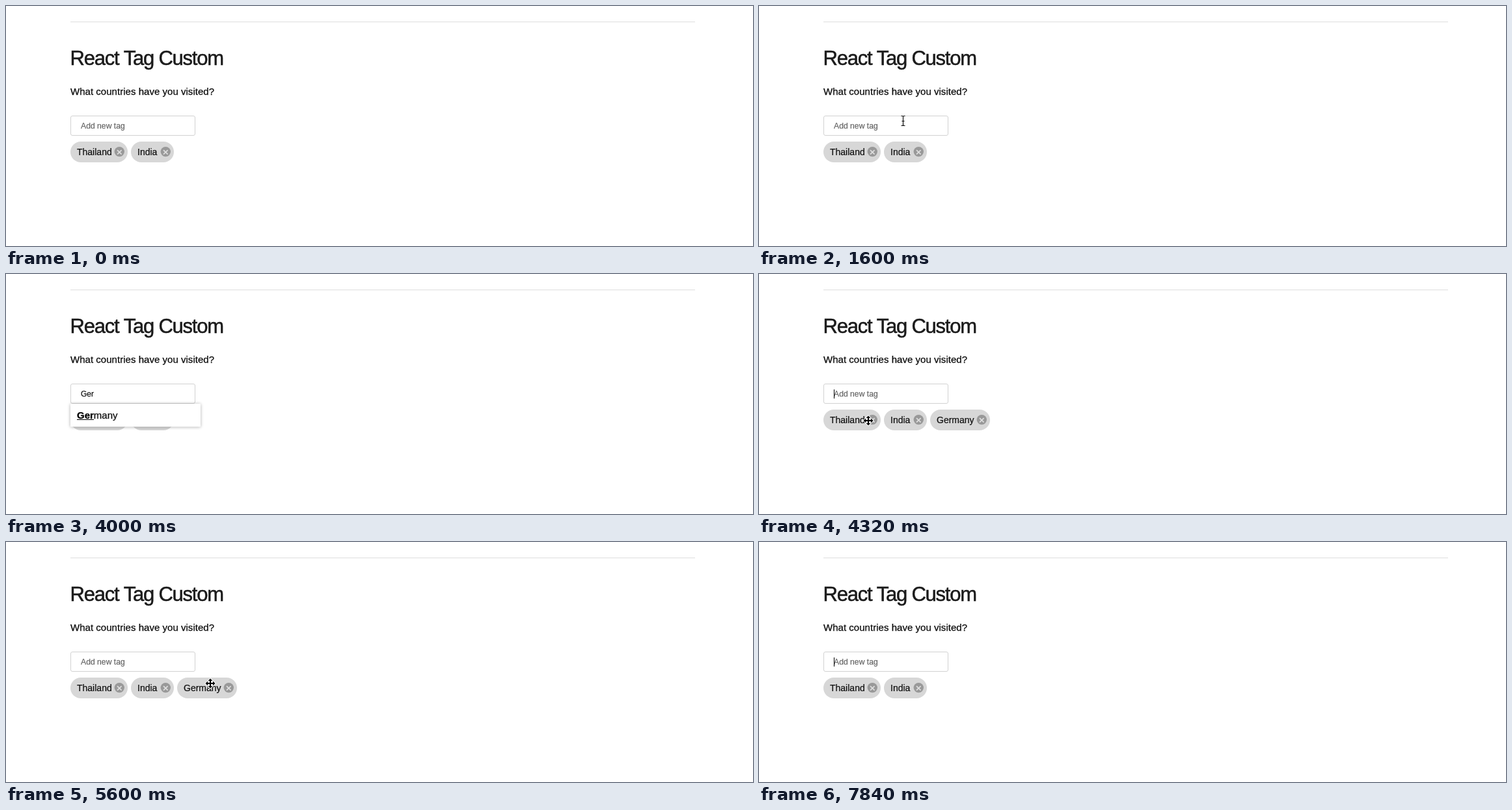
These frames come from a looping animation (1148 px wide and 370 px high, 8000 ms). An HTML page with a canvas:

```html
<!DOCTYPE html>
<html lang="en">
<head>
<meta charset="utf-8">
<title>React Tag Custom</title>
<style>
  html, body { margin: 0; width: 100%; height: 100%; overflow: hidden; background: #fff; }
  canvas { display: block; }
</style>
</head>
<body>
<canvas id="stage" width="1148" height="370"></canvas>
<script>
const ctx = document.getElementById('stage').getContext('2d');
const LOOP = 8000;
const SANS = '"Liberation Sans", Arial, sans-serif';

const TYPED = [3040, 4160];
const GERMANY = [4160, 7200];

// Spans in which the text caret is lit.
const CARET = [
  [480, 800], [1120, 1440], [1920, 2240], [2560, 3360], [3680, 4000],
  [4160, 4480], [4640, 4960], [5280, 5600], [5920, 6240], [6560, 6720],
  [7040, 7520], [7840, 8000]
];

// Each pointer pose holds until the next one.
const POINTER = [
  [0],
  [160, 'beam', 252, 189], [320, 'hand', 245, 226], [480, 'move', 236, 223],
  [640, 'move', 226, 220], [800, 'move', 222, 219],
  [1440, 'beam', 222, 192], [1600, 'beam', 221.5, 177], [1760, 'beam', 220.5, 182],
  [1920, 'beam', 219.5, 184], [2720],
  [4320, 'move', 168, 226], [4480, 'move', 142, 227], [4640, 'move', 152, 229],
  [4800, 'arrow', 189, 235], [4960, 'move', 216, 226], [5120, 'move', 284, 226],
  [5280, 'hand', 347, 231], [5440, 'move', 328, 222], [5600, 'move', 314, 218],
  [5760, 'beam', 274.5, 190], [5920, 'beam', 254.5, 186], [7040]
];

const within = (t, [from, to]) => t >= from && t < to;

// A hairline stroke gives the slightly heavier smoothing of the page's type.
function text(str, x, y, size, color = '#111', { weight = '', spacing = 0 } = {}) {
  ctx.font = `${weight} ${size}px ${SANS}`;
  ctx.letterSpacing = spacing + 'px';
  ctx.fillStyle = ctx.strokeStyle = color;
  ctx.lineWidth = size / 60;
  ctx.fillText(str, x, y);
  ctx.strokeText(str, x, y);
}

function box(x, y, w, h, r, color) {
  ctx.beginPath();
  ctx.roundRect(x, y, w, h, r);
  ctx.fillStyle = color;
  ctx.fill();
}

function chip(label, x, width) {
  box(x, 209, width, 32, 16, '#d7d7d7');
  text(label, x + 10, 230, 14);
  const cx = x + width - 12.7, cy = 224.6, arm = 3.3;
  box(cx - 7.7, cy - 7.7, 15.4, 15.4, 7.7, '#999');
  ctx.beginPath();
  for (const s of [-1, 1]) {
    ctx.moveTo(cx - arm, cy + 0.8 - s * arm);
    ctx.lineTo(cx + arm, cy + 0.8 + s * arm);
  }
  ctx.strokeStyle = '#dedede';
  ctx.lineWidth = 1.7;
  ctx.stroke();
}

function dropdown() {
  ctx.save();
  ctx.shadowColor = 'rgba(0,0,0,.32)';
  ctx.shadowBlur = 5;
  ctx.shadowOffsetY = 0.5;
  box(99, 200, 200, 35.5, 1, '#fff');
  ctx.restore();
  text('Ger', 109, 223, 15, '#000', { weight: 'bold' });
  text('many', 134.8, 223, 15);
  ctx.fillStyle = '#000';
  ctx.fillRect(109, 224, 26, 1);
}

function outlined(path, fill = '#000', edge = '#fff', width = 2) {
  ctx.lineJoin = 'round';
  ctx.lineWidth = width;
  ctx.strokeStyle = edge;
  ctx.stroke(path);
  ctx.fillStyle = fill;
  ctx.fill(path);
}

const SHAPES = {
  move() {
    const p = new Path2D();
    const arm = new Path2D('M0-7.5L3.4-4H1V0H-1V-4H-3.4Z');
    for (let i = 0; i < 4; i++) p.addPath(arm, new DOMMatrix().rotate(i * 90));
    outlined(p);
  },
  beam() {
    const p = new Path2D('M-3-7.5H-1.5Q0-7.5 0-6V6Q0 7.5-1.5 7.5H-3M3-7.5H1.5Q0-7.5 0-6M0 6Q0 7.5 1.5 7.5H3M-2 .5H2');
    ctx.lineWidth = 1.2;
    ctx.strokeStyle = '#111';
    ctx.stroke(p);
  },
  arrow() {
    outlined(new Path2D('M0 0V14L3.3 11L5.5 16L7.8 15L5.6 10.2H10Z'));
  },
  hand() {
    outlined(new Path2D('M-1.5 1Q0-1 1.5 1V6L8 7.5Q10 8 9.5 10L8 16H0L-5 10Q-6 8-4 8L-1.5 10Z'), '#fff', '#000', 1.4);
  }
};

function pointer(t) {
  const [, shape, x, y] = POINTER.findLast(pose => pose[0] <= t);
  if (!shape) return;
  ctx.save();
  ctx.translate(x, y);
  SHAPES[shape]();
  ctx.restore();
}

function draw(t) {
  const typed = within(t, TYPED);
  ctx.fillStyle = '#fff';
  ctx.fillRect(0, 0, 1148, 370);
  ctx.fillStyle = '#dedede';
  ctx.fillRect(99, 24, 960, 1);

  text('React Tag Custom', 98.5, 91, 31, '#1b1b1b', { spacing: -1.23 });
  text('What countries have you visited?', 99, 137, 15, '#0a0a0a', { spacing: 0.03 });

  chip('Thailand', 99, 88);
  chip('India', 192, 66);
  if (within(t, GERMANY)) chip('Germany', 263, 92);

  ctx.beginPath();
  ctx.roundRect(99.5, 169.5, 191, 30, 2.5);
  ctx.strokeStyle = '#d2d2d2';
  ctx.lineWidth = 1;
  ctx.stroke();
  if (typed) text('Ger', 115, 189, 12);
  else text('Add new tag', 115, 189, 12.2, '#666');

  if (typed) dropdown();
  if (CARET.some(span => within(t, span))) {
    ctx.fillStyle = '#000';
    ctx.fillRect(typed ? 135 : 115, 178, 1, 14);
  }
  pointer(t);
}

function tick() {
  draw(performance.now() % LOOP);
  requestAnimationFrame(tick);
}
tick();
</script>
</body>
</html>
```
